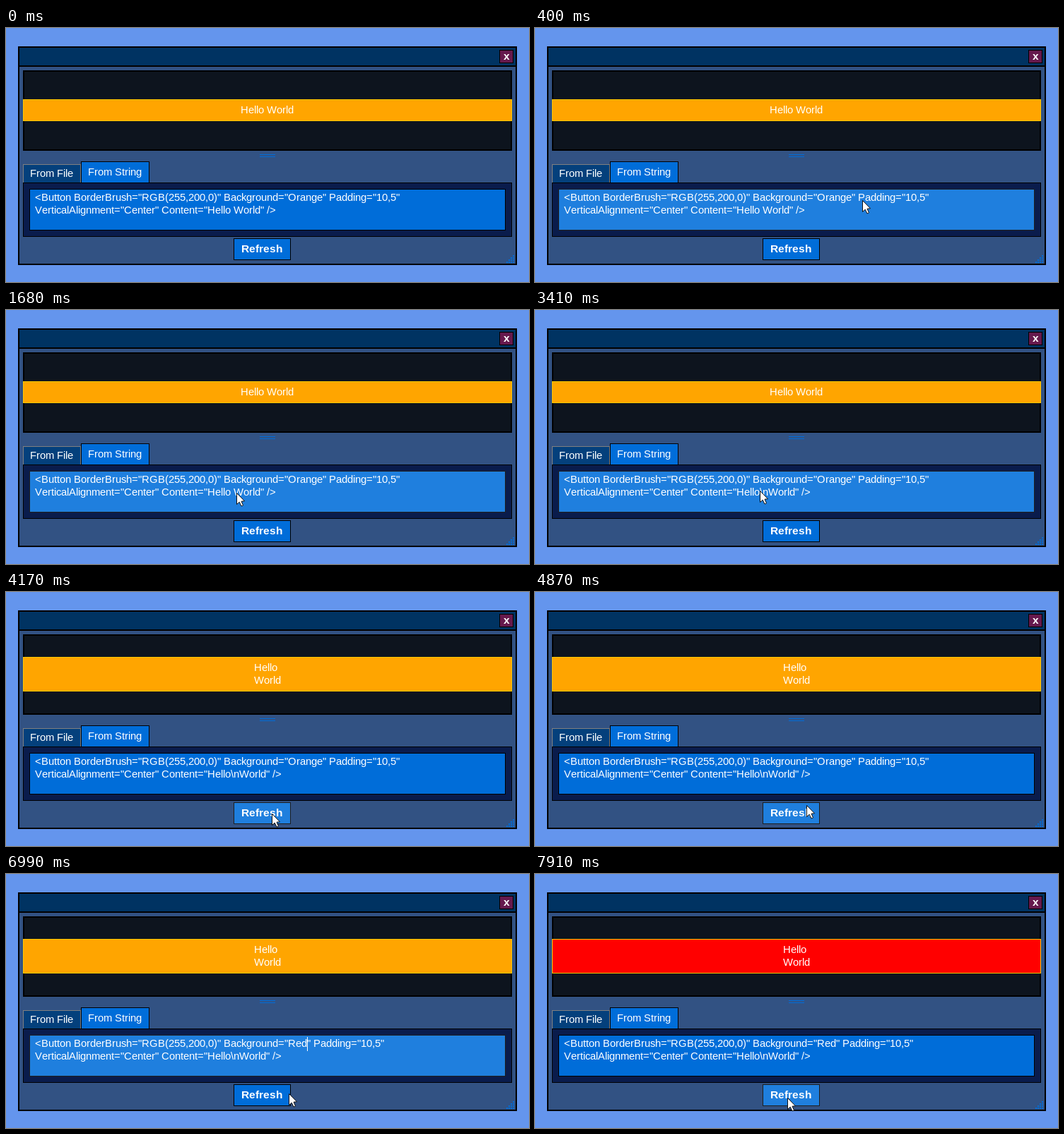
An HTML page with a canvas for the animation above (8 s loop, 740 px wide and 360 px high).

```html
<!DOCTYPE html>
<html lang="en">
<head>
<meta charset="utf-8">
<title>Markup preview</title>
<style>
  html, body { margin: 0; width: 100%; height: 100%; overflow: hidden; background: #6495ed; }
  canvas { display: block; }
</style>
</head>
<body>
<canvas width="740" height="360"></canvas>
<script>
const ctx = document.querySelector('canvas').getContext('2d');
const LOOP = 8000;
const REGULAR = '14.8px "Liberation Sans", Arial, sans-serif';
const BOLD = 'bold 15.5px "Liberation Sans", Arial, sans-serif';
const BLUE = '#006dd9';
const BLINK = 520, HOVER_LAG = 45;
const NEWLINE_SHOWN = 4170, RED_SHOWN = 7800;

// Each pointer move: start, end, then where it arrives
const moves = [
  [180, 630, 376, 117], [950, 1730, 325, 261], [1770, 2090, 318, 256],
  [3410, 3960, 376, 314], [4690, 5410, 425, 235], [6989, 6990, 400, 311],
  [7040, 7080, 385, 362], [7230, 7480, 357, 317]
];

// Each edit: time, separator, colour name, selected or not
const edits = [
  [1910, ' ', 'Orange'], [2660, '', 'Orange'], [2850, '\\', 'Orange'], [2890, '\\n', 'Orange'],
  [5500, '\\n', 'Orange', true],
  [6350, '\\n', 'R'], [6520, '\\n', 'Re'], [6710, '\\n', 'Red']
];

const editor = [33, 228, 674, 59];
const refresh = [322, 298, 81, 31];

function fill(color, x, y, w, h) {
  ctx.fillStyle = color;
  ctx.fillRect(x, y, w, h);
}

function box(rect, color, { border = '#000', line = 1, hovered = false } = {}) {
  const [x, y, w, h] = rect;
  fill(border, ...rect);
  fill(color, x + line, y + line, w - 2 * line, h - 2 * line);
  if (hovered) fill('rgba(255,255,255,.12)', ...rect);
}

// Text is set on whole-pixel advances
const advance = char => Math.round(ctx.measureText(char).width);

function widthOf(str) {
  ctx.font = REGULAR;
  return [...str].reduce((sum, char) => sum + advance(char), 0);
}

function text(str, x, y, font = REGULAR) {
  ctx.font = font;
  ctx.fillStyle = '#fff';
  for (const char of str) {
    ctx.fillText(char, x, y);
    x += advance(char);
  }
}

function pointerAt(t) {
  let x = 545, y = 365;
  for (const [start, end, toX, toY] of moves) {
    const u = Math.min(1, Math.max(0, (t - start) / (end - start)));
    const eased = u * u * (3 - 2 * u);
    x += (toX - x) * eased;
    y += (toY - y) * eased;
  }
  return [Math.round(x), Math.round(y)];
}

function drawPointer(x, y) {
  ctx.save();
  ctx.translate(x + .5, y + .5);
  ctx.fillStyle = '#fff';
  ctx.strokeStyle = '#111';
  const arrow = new Path2D('M0 0V16L3.7 12.7 6.5 18.5 9 17.3 6.5 11.7 11 11.3Z');
  ctx.fill(arrow);
  ctx.stroke(arrow);
  ctx.restore();
}

function drawWindow() {
  fill('#6495ed', 0, 0, 740, 360);
  box([17, 26, 706, 310], '#325283', { line: 2 });
  fill('#003362', 19, 28, 702, 25);
  fill('#000', 19, 53, 702, 2);
  box([698, 31, 20, 19], '#66194d');
  text('x', 704, 45, BOLD);
  box([24, 60, 692, 114], '#0d141e', { line: 2 });
  fill(BLUE, 359, 179, 22, 1);
  fill(BLUE, 359, 182, 22, 1);
  for (let row = 0; row < 4; row++)
    for (let col = 0; col <= row; col++) fill(BLUE, 717 - 3 * col, 322 + 3 * row, 2, 2);
  box([24, 193, 82, 27], '#04407c', { border: '#808080' });
  text('From File', 34, 211);
  box([106, 189, 97, 31], BLUE);
  text('From String', 116, 209);
  box([24, 219, 692, 77], '#0a1c4c');
}

function drawPreview(t, isOver) {
  const lines = t < NEWLINE_SHOWN ? ['Hello World'] : ['Hello', 'World'];
  const height = 13 + 18 * lines.length;
  const rect = [24, Math.floor(117 - height / 2), 692, height];
  const color = t < RED_SHOWN ? '#ffa500' : '#f00';
  box(rect, color, { border: '#ffc800', hovered: isOver(rect) });
  const x = Math.floor(370 - Math.max(...lines.map(widthOf)) / 2);
  lines.forEach((line, i) => text(line, x, rect[1] + 20 + 18 * i));
}

function drawEditor(t, isOver) {
  const [time, gap, color, selected] = edits.findLast(e => e[0] <= t) || [LOOP, ' ', 'Orange'];
  const x = 41;
  const beforeColor = '<Button BorderBrush="RGB(255,200,0)" Background="';
  const beforeGap = 'VerticalAlignment="Center" Content="Hello';
  const onFirstLine = time >= 5500;
  box(editor, BLUE, { hovered: isOver(editor) });
  if (selected && t >= 5590) fill('#000', x + widthOf(beforeColor), 231, widthOf(color), 20);
  text(`${beforeColor}${color}" Padding="10,5"`, x, 245);
  text(`${beforeGap}${gap}World" />`, x, 263);

  const clicked = onFirstLine ? RED_SHOWN : NEWLINE_SHOWN;
  if (t >= time && t < clicked && (t - time) % (2 * BLINK) < BLINK) {
    const typed = onFirstLine ? beforeColor + (selected ? 'Ora' : color) : beforeGap + gap;
    fill('#fff', x + widthOf(typed), onFirstLine ? 231 : 249, 1, 20);
  }
}

function draw(t) {
  const [hoverX, hoverY] = pointerAt(t - HOVER_LAG);
  const isOver = ([x, y, w, h]) =>
    hoverX >= x && hoverX < x + w && hoverY >= y && hoverY < y + h;
  drawWindow();
  drawPreview(t, isOver);
  drawEditor(t, isOver);
  box(refresh, BLUE, { hovered: isOver(refresh) });
  text('Refresh', 333, 318, BOLD);
  drawPointer(...pointerAt(t));
}

const start = performance.now();
function tick() {
  draw((performance.now() - start) % LOOP);
  requestAnimationFrame(tick);
}
tick();
</script>
</body>
</html>
```
